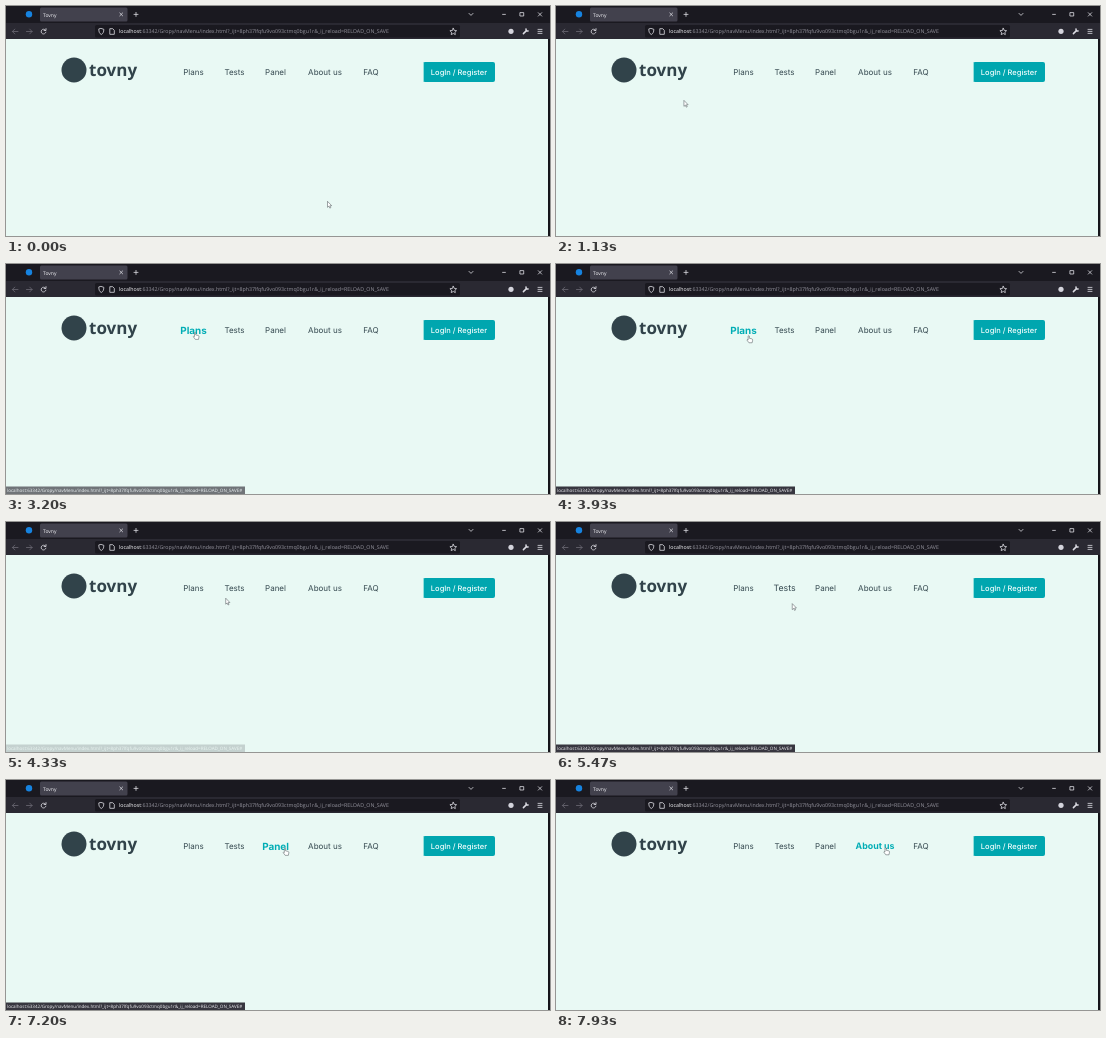
Recreate the animation shown at these times as an HTML page. Size 544 by 230 pixels, loop 8 s.

```html
<!DOCTYPE html>
<html lang="en">
<head>
<meta charset="utf-8">
<title>Navigation hover</title>
<style>
  html, body { margin: 0; width: 100%; height: 100%; overflow: hidden; background: #e9f9f4; }
  svg { display: block; width: 100vw; height: 100vh; text-rendering: geometricPrecision; }
  .ui { font-family: "Open Sans", "Noto Sans", sans-serif; }
  .site { font-family: Inter, sans-serif; text-anchor: middle; }
  .line { fill: none; stroke: #dcdce3; stroke-width: .8; stroke-linecap: round; stroke-linejoin: round; }
  .dim { stroke: #6b6a74; }
</style>
</head>
<body>
<svg viewBox="0 0 544 230" preserveAspectRatio="none">
  <rect width="544" height="230" fill="#e9f9f4"/>

  <!-- browser window -->
  <rect width="544" height="17" fill="#1a1920"/>
  <rect y="17" width="544" height="16" fill="#2a2932"/>
  <rect x="542" y="33" width="2" height="197" fill="#15151a"/>
  <rect x="34" y="1.5" width="87.5" height="14" rx="1.5" fill="#42414d"/>
  <rect x="89" y="19" width="365" height="12.5" rx="1.5" fill="#1a1920"/>
  <circle cx="23" cy="8.3" r="3.2" fill="#1683e0"/>
  <text class="ui" x="37" y="10.6" font-size="5" fill="#f4f4f8">Tovny</text>
  <text class="ui" x="113" y="27.4" font-size="5.27" fill="#96959f"><tspan fill="#fbfbfe">localhost</tspan><tspan id="address"></tspan></text>
  <g class="line">
    <path d="M113.8 7l2.8 2.8m0-2.8l-2.8 2.8M128 8.4h4m-2-2v4M463 7.4l2 2 2-2"/>
    <path d="M496.6 8.4h2.8M514.3 6.6h3.4v3.4h-3.4zM532.3 6.7l3.4 3.4m0-3.4l-3.4 3.4"/>
    <path class="dim" d="M12 25.5H6.5m2.3-2.4l-2.4 2.4 2.4 2.4M20.5 25.5H26m-2.3-2.4l2.4 2.4-2.4 2.4"/>
    <path d="M39.4 24a2.4 2.4 0 1 0 .5 2.2M40 22.6v1.9h-1.9"/>
    <path d="M95.3 22.5l2.5.8c0 2.6-.6 4.2-2.5 5.2-1.9-1-2.5-2.6-2.5-5.2z"/>
    <path d="M104.2 22.7h2.5l1.6 1.6v4h-4.1z"/>
    <path d="M447.3 22.3l1 2.1 2.3.3-1.7 1.6.4 2.3-2-1.1-2.1 1.1.4-2.3-1.7-1.6 2.3-.3z"/>
    <path d="M532 23.4h4M532 25.4h4M532 27.4h4"/>
    <path stroke-width="1.5" d="M517.4 27.6l3-3M520 22.9l.2 1.9 1.9.2"/>
  </g>
  <circle cx="505" cy="25.3" r="2.6" fill="#d4d4dc"/>

  <!-- page header -->
  <circle cx="68" cy="64" r="12.5" fill="#31434a"/>
  <text class="ui" x="83" y="70" font-size="17" font-weight="700" fill="#31434a">tovny</text>
  <g id="nav" class="site"></g>
  <rect x="417" y="56" width="72" height="20" rx="2" fill="#00a6af"/>
  <path d="M417.5 57v18" stroke="#8fe0dc"/>
  <text class="site" x="453" y="68.8" font-size="7.5" font-weight="500" fill="#f4fffe">LogIn / Register</text>

  <g id="status">
    <rect y="222.5" width="239" height="7.5" fill="#37363f"/>
    <text id="link" class="ui" x="1" y="228" font-size="4.54" fill="#f0f0f4"></text>
  </g>

  <g id="cursor" stroke="#454c50" stroke-width=".5" fill="#fff" stroke-linejoin="round">
    <path id="arrow" d="M0 0v6l1.4-1.2.9 2 1-.4-.9-2h1.8z"/>
    <path id="hand" d="M0 .6q.6-.9 1.2 0v2.3l2.6.6q.8.3.7 1.3l-.5 2.6H.8L-1.2 4.7q.1-.9 1.2-.2z"/>
  </g>
</svg>
<script>
const LOOP = 8000;
const INK = '#34484f', TEAL = '#00adb5';
const GROW = 250;                           // link growing and shrinking
const STATUS_DELAY = 190, STATUS_FADE = 100;

const $ = id => document.getElementById(id);

const path = ':63342/Gropy/navMenu/index.html?_ijt=8ph37lfqfu9vo093ctmq0bgu1r&_ij_reload=RELOAD_ON_SAVE';
$('address').textContent = path;
$('link').textContent = 'localhost' + path + '#';

const links = [['Plans', 187.5], ['Tests', 228.5], ['Panel', 269.5], ['About us', 319], ['FAQ', 365]]
  .map(([label, x]) => {
    const text = document.createElementNS('http://www.w3.org/2000/svg', 'text');
    text.textContent = label;
    text.setAttribute('x', x);
    $('nav').append(text);
    return { text, x, reach: 1.5 + 2.4 * label.length };
  });

// time, x, y of the pointer tip
const route = [
  [200, 321.5, 195.3], [1130, 127.8, 94.4], [1600, 187, 69], [2760, 192, 80],
  [3200, 188.5, 68], [3900, 190, 71], [4330, 219.7, 76.2], [4700, 226, 68],
  [5200, 231, 70], [5470, 236.2, 81.6], [5900, 256, 82], [6400, 276.7, 67.8],
  [7500, 279, 68], [7800, 292, 68], [7930, 329, 67.4]
];

function pointer(t) {
  const next = route.findIndex(key => key[0] > t);
  if (next < 1) return route.at(next).slice(1);
  const [t0, x0, y0] = route[next - 1], [t1, x1, y1] = route[next];
  const p = (t - t0) / (t1 - t0);
  return [x0 + (x1 - x0) * p, y0 + (y1 - y0) * p];
}

function linkAt(t) {
  const [x, y] = pointer(t);
  return y < 75 && links.find(link => Math.abs(x - link.x) < link.reach);
}

// Share of the last `span` ms in which the test held: a linear ramp both ways.
function ramp(t, span, test) {
  const samples = 25;
  let hits = 0;
  for (let i = 0; i < samples; i++) {
    if (test(linkAt(t - span * (i + .5) / samples))) hits++;
  }
  return hits / samples;
}

function draw(t) {
  const hovered = linkAt(t);
  for (const link of links) {
    const size = 8 + 1.9 * ramp(t, GROW, other => other === link);
    link.text.setAttribute('font-size', size);
    link.text.setAttribute('y', 66 + size * .363);
    link.text.setAttribute('font-weight', link === hovered ? 700 : 400);
    link.text.setAttribute('fill', link === hovered ? TEAL : INK);
  }
  $('status').setAttribute('opacity', ramp(t - STATUS_DELAY, STATUS_FADE, Boolean));
  $('cursor').setAttribute('transform', `translate(${pointer(t)})`);
  $('hand').setAttribute('visibility', hovered ? 'visible' : 'hidden');
  $('arrow').setAttribute('visibility', hovered ? 'hidden' : 'visible');
}

const begin = performance.now();
function tick() {
  draw((performance.now() - begin) % LOOP);
  requestAnimationFrame(tick);
}
tick();
</script>
</body>
</html>
```
